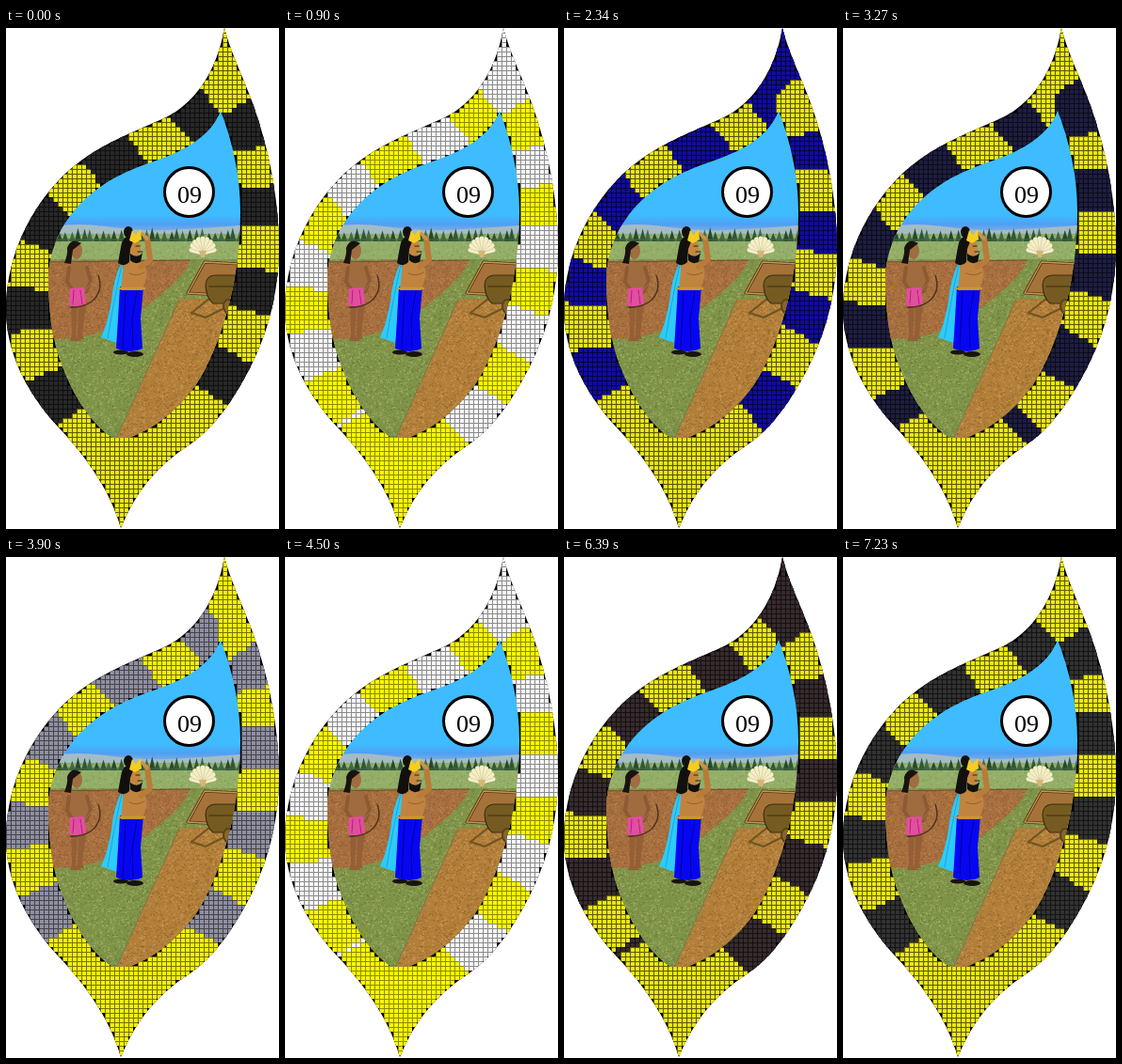
Write an HTML page with a canvas that moves like this. It is 290 by 533 pixels and loops after 7260 ms.

```html
<!DOCTYPE html>
<html lang="en">
<head>
<meta charset="utf-8">
<title>Leaf window</title>
<style>
html, body { margin: 0; width: 100%; height: 100%; overflow: hidden; background: #fff; }
canvas { display: block; }
</style>
</head>
<body>
<canvas id="c" width="290" height="533"></canvas>
<script>
const W = 290, H = 533, LOOP = 7260, STEP = 30, CELL = 5, TURNS = 4;
const ctx = document.getElementById('c').getContext('2d');

const outer = new Path2D(`M232 0 C240 30 252 52 262 80 C278 124 290 180 290 232
  C290 300 268 352 240 395 C226 416 212 432 194 444 C158 468 138 494 122 532
  C110 490 84 455 55 424 C22 388 0 345 0 300 C0 250 20 200 57 161
  C90 127 128 114 168 96 C202 80 224 45 232 0Z`);
const inner = new Path2D(`M228 88 C241 122 249 158 249 195 C249 250 238 312 210 366
  C190 402 160 425 131 436 L113 436 C86 418 68 384 56 350 C47 322 45 290 45 264
  C47 225 68 190 103 167 C136 145 166 142 193 126 C210 116 222 104 228 88Z`);

// Centre line of the rim, one point for every half band, clockwise from the bottom
const rim = [[75, 440], [47, 393], [27, 345], [22, 298], [28, 255], [45, 212], [78, 180],
  [117, 145], [162, 115], [197, 86], [229, 60], [259, 108], [267, 147], [269, 189],
  [269, 234], [266, 280], [253, 323], [226, 367], [203, 410], [150, 456]];

// time, red, green, blue of the moving bands
const tones = [[0, 40, 40, 40], [900, 250, 250, 250], [2340, 18, 12, 160], [3270, 30, 30, 66],
  [4500, 250, 250, 250], [5520, 60, 36, 42], [7230, 50, 50, 50], [7260, 40, 40, 40]];

let seed = 7;
const rnd = () => (seed = seed * 16807 % 2147483647) / 2147483647;
const mix = (a, b, k) => a + (b - a) * k;
const rgb = c => `rgb(${c.map(Math.round).join()})`;
const dim = (c, k) => rgb(c.map(v => v * k));

function rimPos(x, y) {
  let best = 1e9, pos = 0;
  for (let i = 0; i < rim.length - 1; i++) {
    const [ax, ay] = rim[i], dx = rim[i + 1][0] - ax, dy = rim[i + 1][1] - ay;
    const k = Math.max(0, Math.min(1, ((x - ax) * dx + (y - ay) * dy) / (dx * dx + dy * dy)));
    const d = Math.hypot(x - ax - k * dx, y - ay - k * dy);
    if (d < best) { best = d; pos = (i + k) / 2; }
  }
  return pos;
}

const cells = [];
for (let y = 0; y < H; y += CELL) {
  for (let x = 0; x < W; x += CELL) {
    const mx = x + CELL / 2, my = y + CELL / 2;
    if (ctx.isPointInPath(outer, mx, my) && !ctx.isPointInPath(inner, mx, my))
      cells.push({ x, y, u: rimPos(mx, my) });
  }
}

function makeScene() {
  const cv = document.createElement('canvas');
  cv.width = W; cv.height = H;
  const g = cv.getContext('2d');
  const fill = (d, c) => { g.fillStyle = c; g.fill(new Path2D(d)); };
  const line = (d, c, w = 1) => { g.strokeStyle = c; g.lineWidth = w; g.stroke(new Path2D(d)); };
  const disc = (x, y, rx, ry, c) => {
    g.fillStyle = c; g.beginPath(); g.ellipse(x, y, rx, ry, 0, 0, 7); g.fill();
  };
  const soil = (d, base, specks, n, box) => {
    const p = new Path2D(d), [x, y, w, h] = box;
    g.save(); g.clip(p);
    g.fillStyle = base; g.fillRect(x, y, w, h);
    for (let i = 0; i < n; i++) {
      g.fillStyle = specks[i % specks.length];
      g.fillRect(x + rnd() * w, y + rnd() * h, 1.4, 1);
    }
    g.restore();
  };
  g.lineJoin = g.lineCap = 'round';
  g.clip(inner);

  const sky = g.createLinearGradient(0, 88, 0, 214);
  sky.addColorStop(0, '#3dbcff');
  sky.addColorStop(.88, '#3fbcff');
  sky.addColorStop(.96, '#4f9ff4');
  sky.addColorStop(1, '#6fa9e6');
  g.fillStyle = sky; g.fillRect(40, 80, 215, 140);
  fill('M40 213 Q70 206 105 211 T170 215 T250 210 V225 H40Z', '#a3bcc4');

  // distant wood and meadow
  soil('M40 219H255V250H40Z', '#93ae68', ['#a8bd7c', '#7a9c52'], 500, [40, 219, 215, 31]);
  for (let x = 44, i = 0; x < 255; x += 5 + rnd() * 3, i++) {
    const h = 9 + rnd() * 6;
    fill(`M${x} ${227 - h} l3.5 ${h} h-7Z`, ['#2f5638', '#40694a', '#254730'][i % 3]);
  }
  g.fillStyle = 'rgba(60, 100, 62, .6)'; g.fillRect(40, 224, 215, 3);

  soil('M40 246H255V440H40Z', '#7f9449', ['#5f7a36', '#a0ac62', '#72893f', '#b0b273'], 6500, [40, 245, 215, 195]);
  soil('M40 248 L196 247 Q188 265 165 283 Q135 309 104 322 Q74 333 40 331Z', '#a87040',
    ['#8c5a31', '#bd8751', '#9d6638'], 3000, [40, 246, 160, 88]);
  line('M45 249 L196 247', '#735034');
  soil('M184 289 L250 286 V360 L165 440 H117Z', '#b3803c',
    ['#936126', '#cc9c56', '#a67230'], 3600, [115, 285, 135, 155]);
  line('M184 289 L117 437', '#8a713e');

  // fan tree
  for (let i = 0; i < 9; i++) {
    const a = Math.PI * (1.02 + i * .12);
    const x = 209 + Math.cos(a) * 12, y = 237 + Math.sin(a) * 13;
    line(`M209 239 L${x} ${y}`, '#f5efc8', 5);
  }
  for (let i = 0; i < 8; i++) {
    const a = Math.PI * (1.08 + i * .12);
    line(`M209 239 L${209 + Math.cos(a) * 14} ${238 + Math.sin(a) * 15}`, '#c9be8c', .6);
  }
  fill('M205 237 h8 l-2 7 h-4Z', '#d6b476');

  // trough and cart
  fill('M193 282 L211 248 L250 250 V286Z', '#a5733a');
  line('M193 282 L211 249 L248 251 M193 282 L245 285', '#563816', 3);
  line('M193 282 L211 249 L248 251 M193 282 L245 285', '#c79651', 1.3);
  line('M216 288 L197 303 L212 308 L232 298', '#6f5520', 2);
  fill('M212 274 Q212 264 222 263 H250 V293 H220 Q213 288 212 274Z', '#755b22');
  line('M212 274 Q212 264 222 263 H250 M212 274 Q213 288 220 293 H246 M216 275 H246', '#3d2e10', 1.2);
  disc(236, 296, 6, 8, '#59451b'); disc(236, 296, 4, 6, '#856829');

  // archer
  fill('M69 294 L76 294 L74 328 L81 333 H68 L70 326Z M77 294 H85 L81 326 L83 331 H76Z', '#945f36');
  fill('M70 250 L82 249 Q90 254 90 265 L88 280 L82 278 L81 268 L82 279 H68 L63 267 Q63 254 70 250Z', '#a06c3f');
  line('M67 255 L65 270 L73 282 M86 255 L90 269 L85 281', '#8d5a33', 4);
  fill('M68 277 L83 276 L85 293 Q76 298 67 295Z', '#e64ba4');
  line('M72 279 L71 294 M79 279 L81 294', '#a8266f');
  disc(75, 237, 6, 9, '#a06c40');
  fill('M80 229 Q69 222 65 234 Q66 240 62 250 L69 251 L71 236Z', '#19130f');
  line('M98 263 Q104 280 91 291 Q81 298 68 297', '#51331d', 1.5);
  line('M98 263 L68 297', '#a28b69', .6);

  // king
  fill('M123 249 Q114 267 112 291 Q107 317 101 329 L117 335 L129 276Z', '#2ccbfa');
  line('M123 252 Q116 282 108 330', '#1b99cd', .8);
  fill('M121 275 H146 L143 309 L145 341 Q133 347 117 341 L119 309Z', '#0606f4');
  line('M127 281 L124 341 M139 280 L134 310 L135 341', '#03038b');
  fill('M125 248 L139 246 Q151 251 149 265 L145 279 H122Z', '#c08440');
  line('M143 254 L153 247 L150 224', '#b97b39', 6);
  line('M150 224 L145 219', '#cb924c', 3.5);
  line('M131 261 Q139 265 147 260', '#8a5926', .8);
  line('M120 277 H147', '#c99a2c', 2.5);
  disc(136, 234, 7, 11, '#c4873f');
  fill('M137 222 Q124 218 122 233 L119 250 Q126 255 131 249 L132 235Z M132 240 Q139 246 145 239 L143 249 Q136 252 132 247Z', '#11100e');
  disc(130, 217, 5, 6, '#11100e');
  line('M138 232 h4 M140 238 h5', '#302014', 1.2);
  fill('M131 226 L134 215 L138 220 L143 214 L144 225 L137 229Z', '#f5cd21');
  disc(122, 345, 8, 2.5, '#17130f'); disc(137, 347, 9, 3, '#17130f');
  return cv;
}
const scene = makeScene();

function tone(t) {
  let i = 0;
  while (t > tones[i + 1][0]) i++;
  const a = tones[i], b = tones[i + 1], k = (t - a[0]) / (b[0] - a[0]);
  return [1, 2, 3].map(j => mix(a[j], b[j], k));
}

function badge() {
  ctx.beginPath();
  ctx.arc(194.5, 174.5, 26, 0, Math.PI * 2);
  ctx.fillStyle = '#fff'; ctx.fill();
  ctx.lineWidth = 3; ctx.strokeStyle = '#000'; ctx.stroke();
  ctx.fillStyle = '#000';
  ctx.font = '26px "Liberation Serif", serif';
  ctx.textAlign = 'center';
  ctx.fillText('09', 195, 186);
}

function draw(t) {
  const band = tone(t), light = Math.min(...band) / 250, phase = t / LOOP * TURNS;
  const yellow = [mix(232, 255, light), mix(228, 252, light), mix(24, 0, light)];
  const paint = c => ({ face: rgb(c), seam: dim(c, mix(.38, .55, light)) });
  const on = paint(yellow), off = paint(band);

  ctx.clearRect(0, 0, W, H);
  ctx.save();
  ctx.clip(outer);
  ctx.fillStyle = '#000';
  ctx.fillRect(0, 0, W, H);
  for (const { x, y, u } of cells) {
    const v = u - phase;
    const lit = u < .2 || u > 9.2 || Math.abs(v - Math.round(v)) < .25;
    const { face, seam } = lit ? on : off;
    ctx.fillStyle = seam;
    ctx.fillRect(x, y, CELL, CELL);
    ctx.fillStyle = face;
    if (light > .5) ctx.fillRect(x + 1, y + 1, 4, 4);
    else {
      ctx.fillRect(x + 1.4, y + 1, 3.2, 4);
      ctx.fillRect(x + 1, y + 1.4, 4, 3.2);
    }
  }
  ctx.restore();

  ctx.drawImage(scene, 0, 0);
  badge();
}

const start = performance.now();
function tick() {
  const t = (performance.now() - start) % LOOP;
  draw(Math.floor(t / STEP) * STEP);
  requestAnimationFrame(tick);
}
tick();
</script>
</body>
</html>
```
